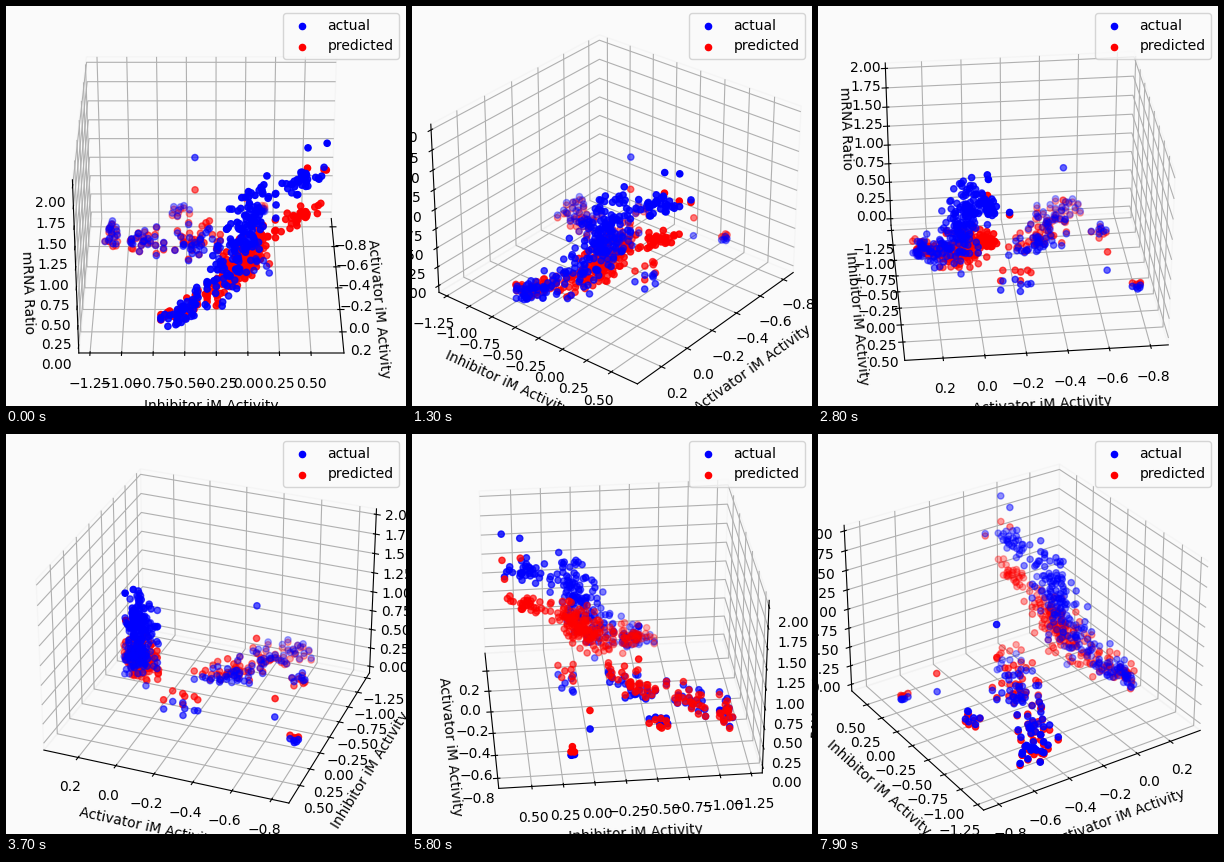
Recreate the animation shown at these times as a matplotlib script. Size 400 by 400 pixels, loop 8000 ms.

```python
import numpy as np
import matplotlib.pyplot as plt
from matplotlib.animation import FuncAnimation

FRAMES, INTERVAL, STEP = 80, 100, 3
BG = "#fafafa"
rng = np.random.default_rng(12)


def noise(n, sd):
    """Normal noise with the far tails pulled in."""
    return sd * np.clip(rng.normal(size=n), -2.1, 2.1)


def logistic(x):
    return 1 / (1 + np.exp(-x))


def rising_trend():
    """mRNA climbs with inhibitor activity: low tail, dense core, high end."""
    inh = np.concatenate([-0.50 + noise(50, 0.10),
                          -0.05 + noise(150, 0.13),
                          0.42 + noise(30, 0.09)])
    n, x = len(inh), inh + 0.04
    slope = logistic(6 * (inh + 0.08))
    width = 4 * slope * (1 - slope)
    act = np.minimum(0.06 - 0.28 * x + 0.18 * x**2, 0.25)
    act += noise(n, 0.015 + 0.03 * width)
    actual = 0.1 + 1.5 * slope + noise(n, 0.03 + 0.22 * width)
    predicted = 0.15 + 1.05 * logistic(5 * inh) + noise(n, 0.03 + 0.1 * width)
    return act, inh, actual, predicted


def low_band(n):
    """Weakly active points at the far side of the activator axis."""
    inh = rng.uniform(-1.2, -0.2, n)
    act = -0.25 + 0.22 * inh + noise(n, 0.06)
    actual = 0.17 + 0.2 * (inh + 1.2) + noise(n, 0.06)
    predicted = actual + 0.12 * (inh + 0.9) + noise(n, 0.03)
    return act, inh, actual, predicted


def blob(n, act, inh, actual, shift, size):
    level = actual + noise(n, size)
    return (act + noise(n, size), inh + noise(n, size),
            level, level + shift + noise(n, size / 2))


outliers = np.transpose([
    (-0.032, 0.619, 1.99, 1.66),
    (-0.035, 0.470, 1.93, 1.68),
    (-0.130, 0.610, 1.57, 1.54),
    (-0.459, -0.425, 1.28, 0.86),
    (-0.650, 0.000, 0.26, 0.50),
])

act, inh, actual, predicted = np.hstack([
    outliers,
    rising_trend(),
    low_band(72),
    blob(7, -0.67, -0.55, 0.31, -0.04, 0.035),
    blob(7, -0.19, 0.08, 0.22, 0.15, 0.05),
    blob(5, -0.785, 0.154, 0.15, 0.04, 0.013),
])

fig = plt.figure(figsize=(4, 4), dpi=100, facecolor=BG)
ax = fig.add_axes([0, 0, 1, 1], projection="3d", facecolor=BG)
for z, color, label in ((actual, "b", "actual"), (predicted, "r", "predicted")):
    ax.scatter(act, inh, np.maximum(z, 0.1), c=color, label=label)

ax.set_xlabel("Activator iM Activity")
ax.set_ylabel("Inhibitor iM Activity")
ax.set_zlabel("mRNA Ratio")
ax.set_xticks(np.linspace(-0.8, 0.2, 6))
ax.set_yticks(np.arange(-1.25, 0.6, 0.25))
ax.set_zticks(np.arange(0, 2.1, 0.25))
ax.set_xlim(-0.886, 0.383)
ax.set_ylim(-1.339, 0.761)
ax.set_zlim(-0.09, 2.07)
for axis in (ax.xaxis, ax.yaxis, ax.zaxis):
    axis.pane.fill = False
    axis.pane.set_edgecolor("#f0f0f0")
ax.legend(loc="upper right", facecolor=BG)


def update(i):
    # the tiny offset keeps the axis sides stable at right angles
    ax.view_init(elev=30, azim=STEP * i + 0.01)
    return ()


anim = FuncAnimation(fig, update, frames=FRAMES, interval=INTERVAL,
                     repeat=True, repeat_delay=0, blit=False)
plt.show()
```
